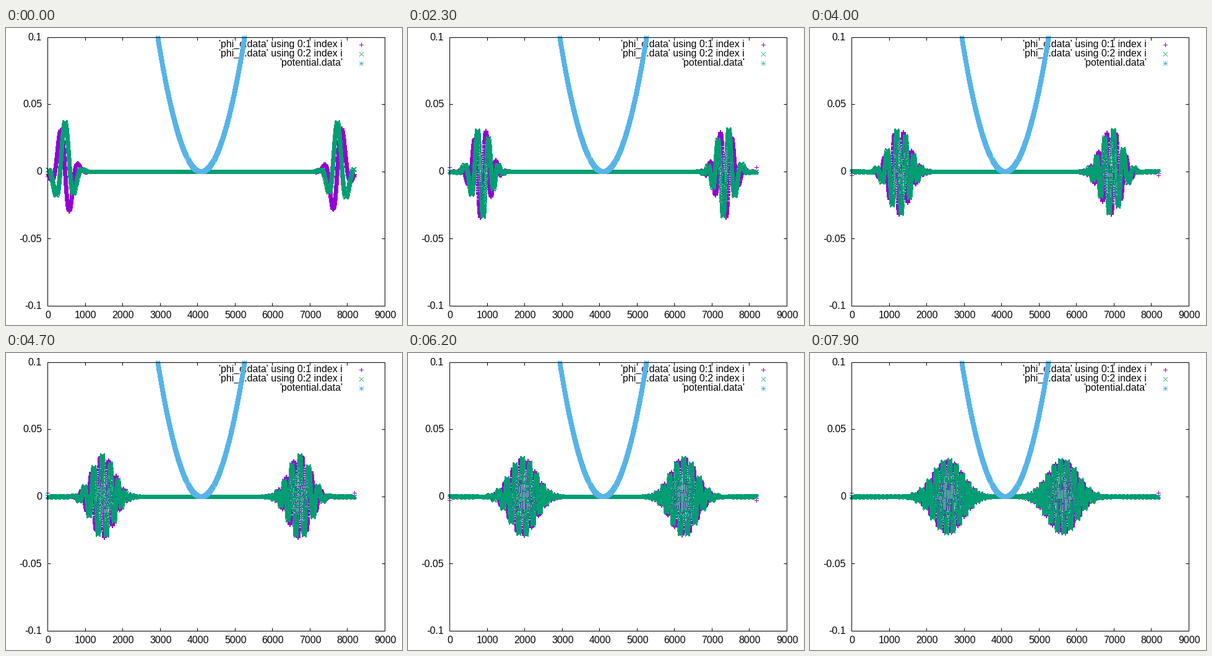
Write a matplotlib script that moves like this. It is 640 px wide and 480 px high and loops after 8000 ms.

```python
import numpy as np
import matplotlib.pyplot as plt
from matplotlib.animation import FuncAnimation
from matplotlib.path import Path

plt.rcParams["text.hinting"] = "default"

W, H, DPI = 640, 480, 100
PX = 72 / DPI
LEFT, RIGHT, TOP, BOTTOM = 67, 612, 15, 449
FRAMES, STEP = 80, 100
N, MID = 8192, 4096
PURPLE, GREEN, BLUE = "#9400d3", "#009e73", "#56b4e9"

# Packet in a harmonic well: mass, frequency, start distance and speed / frequency
MASS, FREQ = 0.00094, 0.0107
DIST, PUSH = 3645, 1185
# Squared width: cos^2, cross and sin^2 terms
W_CC, W_CS, W_SS = 76355, 16360, 463600
PEAK = 0.0369

x = np.arange(N)


def packet(x, t, shift=0):
    c, s = np.cos(FREQ * t), np.sin(FREQ * t)
    d = DIST * c - PUSH * s
    v = FREQ * (DIST * s + PUSH * c)
    width = W_CC * c * c + 2 * W_CS * s * c + W_SS * s * s
    rate = 2 * FREQ * ((W_SS - W_CC) * s * c + W_CS * (c * c - s * s))
    action = MASS / 2 * (DIST * PUSH * FREQ - d * v)
    phase = 1.42 + action - 0.182 * t - 0.9 * (1 - np.exp(-t / 12))
    u = x - (MID - d)
    env = PEAK * (W_CC / width) ** 0.21 * np.exp(-(u + shift) ** 2 / width)
    return env * np.exp(1j * (phase + MASS * v * u + MASS * rate / (4 * width) * u * u))


def ripple(x, t):
    env = 0.0005 * np.exp(-(x / (300 + 12 * t)) ** 2)
    return env * np.exp(1j * (0.03 * x - np.pi * t))


def wave(t):
    y = N - 1 - x
    psi = packet(x, t) + packet(y, t, 12) + ripple(x, t) + ripple(y, t)
    # The two end points flip sign at every step
    edge = -(-1) ** t * 0.0037 * np.exp(-t / 200)
    psi[[0, -1]] = edge + 1j * psi[[0, -1]].imag
    return psi


def box(x0, y0, x1, y1):
    return Path([(x0, y0), (x1, y0), (x1, y1), (x0, y1), (x0, y0)], closed=True)


# Markers built from whole pixels, 7 px across
PLUS = [box(-3, -1, 4, 0), box(0, -4, 1, 3)]
CROSS = [box(i, j - 1, i + 1, j) for i in range(-3, 4) for j in {i, -i}]
MARKS = {"+": Path.make_compound_path(*PLUS),
         "x": Path.make_compound_path(*CROSS),
         "*": Path.make_compound_path(*PLUS, *CROSS)}

fig = plt.figure(figsize=(W / DPI, H / DPI), dpi=DPI, facecolor="white")
# The tenth of a pixel makes half-pixel rows round upwards
ax = fig.add_axes([LEFT / W, 1 - (BOTTOM - 0.1) / H, (RIGHT - LEFT) / W, (BOTTOM - TOP) / H])
ax.set(xlim=(0, 9000), ylim=(-0.1, 0.1))
ax.set_xticks(range(0, 9001, 1000))
ax.set_yticks([-0.1, -0.05, 0, 0.05, 0.1])
ax.tick_params(direction="in", top=True, right=True, length=5 * PX, width=PX,
               labelbottom=False, labelleft=False)
for spine in ax.spines.values():
    spine.set(linewidth=PX, zorder=6)


def label(px, py, text, ha):
    ax.text(px / W, 1 - py / H, text, ha=ha, va="baseline", zorder=1,
            transform=fig.transFigure, family="Liberation Sans", size=16 * PX)


def points(xs, ys, shape, color, z, **kw):
    return ax.plot(xs, ys, ls="none", marker=MARKS[shape], ms=8 * PX, mew=0, mec="none",
                   color=color, clip_on=False, zorder=z, **kw)[0]


for i in range(10):
    label(LEFT + 1 + i * (RIGHT - LEFT) / 9, 469, str(i * 1000), "center")
for i, text in enumerate(["0.1", "0.05", "0", "-0.05", "-0.1"]):
    label(58, 20 + i * (BOTTOM - TOP) / 4, text, "right")

KEYS = [("'phi_c.data' using 0:1 index i", "+", PURPLE),
        ("'phi_c.data' using 0:2 index i", "x", GREEN),
        ("'potential.data'", "*", BLUE)]
for i, (text, shape, color) in enumerate(KEYS):
    label(544, 31 + 15 * i, text, "right")
    points([574 / W], [1 - (27 + 15 * i) / H], shape, color, 5, transform=fig.transFigure)

well = 0.1 * ((x - MID) / 1158) ** 2
inside = well <= 0.1
points(x[inside], well[inside], "*", BLUE, 4)

real = points(x, np.zeros(N), "+", PURPLE, 2)
imag = points(x, np.zeros(N), "x", GREEN, 3)


def update(t):
    psi = wave(t)
    real.set_ydata(psi.real)
    imag.set_ydata(psi.imag)
    return real, imag


anim = FuncAnimation(fig, update, frames=FRAMES, interval=STEP, repeat=True,
                     repeat_delay=0, blit=False)
plt.show()
```
